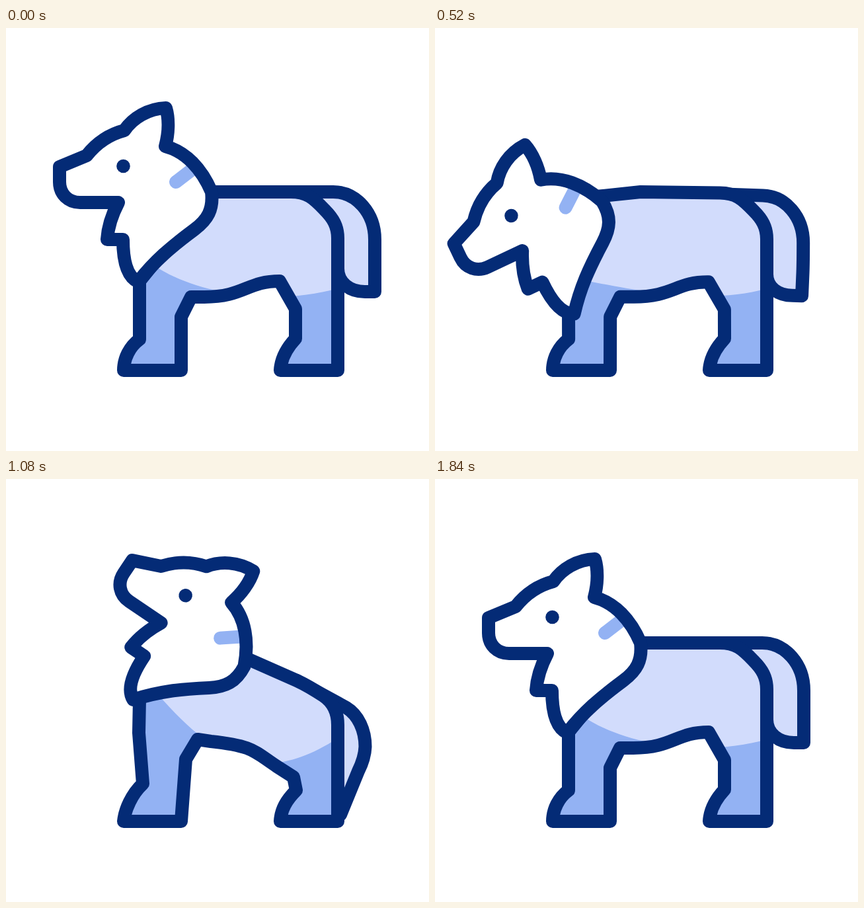
Write an HTML page that moves like this. It is 640 by 640 pixels and loops after 2000 ms.

```html
<!DOCTYPE html>
<html lang="en">
<head>
<meta charset="utf-8">
<title>Howling wolf</title>
<style>
  html, body { margin: 0; width: 100%; height: 100%; overflow: hidden; background: #fff; }
  svg { display: block; width: 100%; height: 100%; }
  .line { stroke: #042b76; stroke-width: 20; stroke-linecap: round; stroke-linejoin: round; }
</style>
</head>
<body>
<svg viewBox="0 0 640 640">
  <defs><clipPath id="bodyClip"><path id="bodyMask"/></clipPath></defs>
  <path id="tail" class="line" fill="#d2dcfc"/>
  <path id="bodyFill" fill="#d2dcfc"/>
  <path id="shade" fill="#93b2f3" clip-path="url(#bodyClip)"/>
  <path id="bodyLine" class="line" fill="none"/>
  <path id="howl" fill="none" stroke="#fee7b1" stroke-width="20" stroke-linecap="round"/>
  <g id="head">
    <path id="face" fill="#fff"/>
    <path d="M257 233L283 213" stroke="#93b2f3" stroke-width="20" stroke-linecap="round"/>
    <path id="faceLine" class="line" fill="none"/>
    <circle cx="177.500" cy="209" r="10.300" fill="#042b76"/>
  </g>
</svg>
<script>
const LOOP = 2000, STEP = 40;
const $ = id => document.getElementById(id);
const lerp = (a, b, k) => a + (b - a) * k;
const ramp = (t, from, to) => Math.min(1, Math.max(0, (t - from) / (to - from)));
const ease = (t, from, to) => { const k = ramp(t, from, to); return k * k * (3 - 2 * k); };

// Blend two paths that share the same commands.
function blend(a, b, k) {
  const ends = b.match(/-?[\d.]+/g);
  let i = 0;
  return a.replace(/-?[\d.]+/g, n => lerp(+n, +ends[i++], k).toFixed(2));
}

const STAND = {
  body: 'L311 248L431 248C455 248 465 257 482 275C495 288 502 300 502 318L502 518L415 518' +
        'C416 500 424 485 438 470L438 425L414 383C365 383 360 407 300 407L280 407L265 437' +
        'L265 518L178 518C178 500 187 482 202 471L202 383L202 383Z',
  tail: 'M431 248L495 248C530 248 558 280 558 320C558 340 558 355 558 365L558 399L543 399' +
        'C520 399 502 385 502 364',
  shade: 'M150 358L222 358C290 405 410 420 502 394L502 540L150 540Z'
};
const SIT = {
  body: 'L311 248L440 305C455 312 465 318 480 328C495 338 502 352 502 372L502 518L415 518' +
        'C416 500 424 486 439 471L435 451L410 435C375 412 375 404 310 397L290 394L272 424' +
        'L265 518L178 518C180 500 190 477 207 461L201 384L202 333Z',
  tail: 'M440 305L515 346C533 357 543.500 380 543.500 405C543 418 540 428 533 442L506 508L500 500' +
        'C502 500 502 515 502 515',
  shade: 'M150 314L220 314C320 434 395 462 502 392L502 540L150 540Z'
};
const FACE = 'M81 210L122 193C137 174 156 161 179 155C192 136 215 122 242 121' +
  'C247 138 246 160 241 179C272 187 296 213 311 248C314 275 305 290 285 305' +
  'C250 331 225 352 200 384C182 376 177 350 177 320L153 320C154 305 159 285 170 264' +
  'L112 264C94 264 81 251 81 233Z';
$('face').setAttribute('d', FACE);
$('faceLine').setAttribute('d', FACE);

// Head pivot and its place in each pose.
const PIVOT = [322, 392];
const REST = { x: 322, y: 392, turn: 0 };
const LOW = { x: 324.3, y: 387.7, turn: -25.3 };
const HIGH = { x: 289.1, y: 408.8, turn: 34 };
const HEAD_MOVES = [[0, 520, REST, LOW], [520, 1080, LOW, HIGH], [1320, 1840, HIGH, REST]];

function drawHead(t) {
  const [from, to, a, b] = HEAD_MOVES.filter(m => t >= m[0]).pop();
  const k = ease(t, from, to);
  const [x, y, turn] = ['x', 'y', 'turn'].map(p => lerp(a[p], b[p], k));
  $('head').setAttribute('transform',
    `translate(${x} ${y}) rotate(${turn}) translate(${-PIVOT[0]} ${-PIVOT[1]})`);
}

function drawBody(t) {
  const rise = ease(t, 1520, 1840);
  const sit = ease(t, 460, 1080) - rise;
  const tailDrop = ease(t, 425, 1080) - rise;
  const bow = ease(t, 0, 520) - ease(t, 520, 1080);
  const body = `M${311 - 67 * bow} ${248 + 7 * bow}` + blend(STAND.body, SIT.body, sit);
  for (const id of ['bodyMask', 'bodyFill', 'bodyLine']) $(id).setAttribute('d', body);
  $('tail').setAttribute('d', blend(STAND.tail, SIT.tail, tailDrop));

  // Bowing lowers the front of the shading and flattens its dip.
  const bowed = 'M150 383L222 383C290 393 410 420 502 394L502 540L150 540Z';
  $('shade').setAttribute('d', blend(blend(STAND.shade, bowed, bow), SIT.shade, sit));
}

// The arc spreads out from the muzzle.
function drawHowl(t) {
  const size = 1 + 0.385 * (t - 1400) / 240;
  const cx = 197 - 51 * size, cy = 143 - 24 * size, r = 56 * size;
  const at = deg => {
    const a = deg * Math.PI / 180;
    return `${cx + r * Math.cos(a)} ${cy + r * Math.sin(a)}`;
  };
  const shown = t > 1160 && t < 1680;
  $('howl').setAttribute('d', shown ? `M${at(-45)}A${r} ${r} 0 1 0 ${at(129)}` : '');
  $('howl').setAttribute('opacity', ramp(t, 1160, 1240) * (1 - ramp(t, 1600, 1680)));
}

function draw(t) {
  drawBody(t);
  drawHead(t);
  drawHowl(t);
}

const start = performance.now();
function tick() {
  const t = (performance.now() - start) % LOOP;
  draw(Math.floor(t / STEP) * STEP);
  requestAnimationFrame(tick);
}
tick();
</script>
</body>
</html>
```
